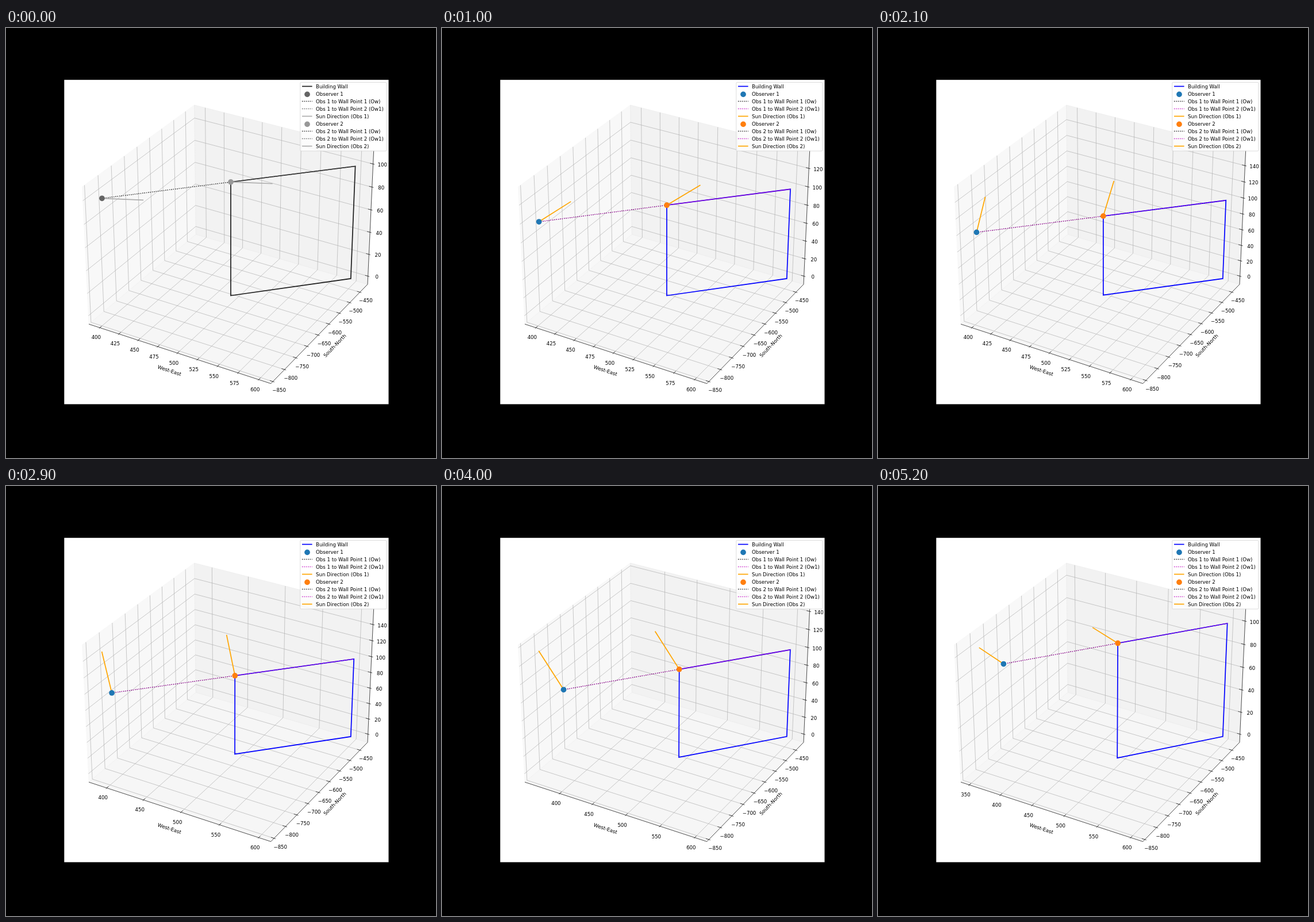
These frames come from a looping animation (748 px wide and 748 px high, 5.3 s). An HTML page with a canvas:

```html
<!DOCTYPE html>
<html lang="en">
<head>
<meta charset="utf-8">
<title>Sun path over a wall</title>
<style>
html, body { margin: 0; height: 100%; overflow: hidden; background: #000; }
canvas { display: block; }
</style>
</head>
<body>
<canvas id="stage" width="748" height="748"></canvas>
<script>
const ctx = document.getElementById('stage').getContext('2d');
const RAD = Math.PI / 180;
const FONT = "8.6px 'DejaVu Sans', sans-serif";
const THIN = 0.68, DOTTED = 1.27, THICK = 1.7;
const DOTS = [1.27, 2.1];

// Half sizes of the box: backing panes, and the part covered by data
const PANE = [0.5952, 0.5952, 0.4464];
const SPAN = [0.5195, 0.5195, 0.3896];
const PAD = [0.0395, 0.0395, 0.0296];
const TICK_OUT = 0.0095, TICK_IN = 0.019;

const COLORS = {
  wall: [0, 0, 255], obs1: [31, 119, 180], obs2: [255, 127, 14],
  black: [0, 0, 0], magenta: [191, 0, 191], sun: [255, 165, 0]
};
const OBS1 = [400, -830, 100], OBS2 = [500, -635, 100], END = [600, -440, 100];
const LEGEND = [
  ['Building Wall', 'wall', 'line'],
  ['Observer 1', 'obs1', 'dot'],
  ['Obs 1 to Wall Point 1 (Ow)', 'black', 'dotted'],
  ['Obs 1 to Wall Point 2 (Ow1)', 'magenta', 'dotted'],
  ['Sun Direction (Obs 1)', 'sun', 'line'],
  ['Observer 2', 'obs2', 'dot'],
  ['Obs 2 to Wall Point 1 (Ow)', 'black', 'dotted'],
  ['Obs 2 to Wall Point 2 (Ow1)', 'magenta', 'dotted'],
  ['Sun Direction (Obs 2)', 'sun', 'line']
];

let grey = false;
let limits;

function color(name) {
  const [r, g, b] = COLORS[name];
  const luma = Math.round(0.299 * r + 0.587 * g + 0.114 * b);
  return grey ? `rgb(${luma},${luma},${luma})` : `rgb(${r},${g},${b})`;
}

// Perspective view: elevation 30, azimuth -60, distance 10
function project([x, y, z]) {
  const depth = 10 - (0.433 * x - 0.75 * y + 0.5 * z);
  const u = 0.866 * x + 0.5 * y;
  const v = -0.25 * x + 0.433 * y + 0.866 * z;
  return [391 + 3048 * u / depth, 364.6 - 3048 * v / depth];
}

const scale = (value, axis) => {
  const [lo, hi] = limits[axis];
  return (2 * (value - lo) / (hi - lo) - 1) * SPAN[axis];
};
const plot = point => project(point.map(scale));
const shift = (point, delta) => point.map((value, i) => value + delta[i]);

function trace(points) {
  ctx.beginPath();
  points.forEach(([x, y]) => ctx.lineTo(x, y));
}

function line(points, stroke, width, dash = []) {
  trace(points);
  ctx.strokeStyle = stroke;
  ctx.lineWidth = width;
  ctx.setLineDash(dash);
  ctx.stroke();
}

function pane(corners, shade) {
  trace(corners.map(project));
  ctx.closePath();
  ctx.fillStyle = ctx.strokeStyle = `rgba(${shade},${shade},${shade},0.5)`;
  ctx.lineWidth = 0.85;
  ctx.setLineDash([]);
  ctx.fill();
  ctx.stroke();
}

function dot([x, y], name) {
  ctx.beginPath();
  ctx.arc(x, y, 4.87, 0, 2 * Math.PI);
  ctx.fillStyle = color(name);
  ctx.fill();
}

function text(string, x, y, align = 'center') {
  ctx.fillStyle = '#000';
  ctx.textAlign = align;
  ctx.fillText(string, x, y);
}

function axisTitle(string, x, y, angle) {
  ctx.save();
  ctx.translate(x, y);
  ctx.rotate(angle * RAD);
  text(string, 0, 3);
  ctx.restore();
}

function ticks(axis) {
  const [lo, hi] = limits[axis], range = hi - lo;
  const step = [10, 20, 25, 50, 100].find(s => s >= range * 1.1 / 9);
  const list = [];
  for (let t = Math.ceil((lo - 0.052 * range) / step) * step; t <= hi + 0.052 * range; t += step) list.push(t);
  return list;
}

function drawAxes() {
  const [a, , c] = PANE;
  pane([[-a, -a, -c], [-a, a, -c], [-a, a, c], [-a, -a, c]], 242);
  pane([[-a, a, -c], [a, a, -c], [a, a, c], [-a, a, c]], 230);
  pane([[-a, -a, -c], [a, -a, -c], [a, a, -c], [-a, a, -c]], 237);

  // Per axis: grid path, place on the axis, tick direction, label direction
  const axes = [
    { grid: t => [[t, -a, -c], [t, a, -c], [t, a, c]], edge: t => [t, -a, -c], tick: [0, -1, 0], out: [0, -1, -1] },
    { grid: t => [[a, t, -c], [-a, t, -c], [-a, t, c]], edge: t => [a, t, -c], tick: [1, 0, 0], out: [1, 0, -1] },
    { grid: t => [[-a, -a, t], [-a, a, t], [a, a, t]], edge: t => [a, a, t], tick: [1, 0, 0], out: [1, 1, 0] }
  ];
  axes.forEach(({ grid }, i) => {
    for (const value of ticks(i)) line(grid(scale(value, i)).map(project), '#b0b0b0', THIN);
  });
  axes.forEach(({ edge, tick, out }, i) => {
    line([edge(-PANE[i]), edge(PANE[i])].map(project), '#000', THIN);
    for (const value of ticks(i)) {
      const at = edge(scale(value, i));
      const ends = [TICK_OUT, -TICK_IN].map(k => shift(at, tick.map(d => d * k)));
      line(ends.map(project), '#000', THIN);
      const [x, y] = project(shift(at, out.map((d, j) => d * PAD[j])));
      text(String(value).replace('-', '\u2212'), x, y + 6.8);
    }
  });
  axisTitle('West-East', 284.3, 595.8, 18.2);
  axisTitle('South-North', 572, 552.5, -45.8);
}

function drawScene(sun) {
  const ground = ([x, y]) => [x, y, 0];
  trace([ground(OBS2), ground(END), END, OBS2].map(plot));
  ctx.closePath();
  ctx.strokeStyle = color('wall');
  ctx.lineWidth = THICK;
  ctx.setLineDash([]);
  ctx.stroke();

  const link = (from, to, name) => line([from, to].map(plot), color(name), DOTTED, DOTS);
  const ray = from => line([from, shift(from, sun)].map(plot), color('sun'), THICK);
  link(OBS1, OBS2, 'black');
  link(OBS1, END, 'magenta');
  ray(OBS1);
  link(OBS2, END, 'magenta');
  ray(OBS2);
  dot(plot(OBS1), 'obs1');
  dot(plot(OBS2), 'obs2');
}

function drawLegend() {
  ctx.beginPath();
  ctx.roundRect(511.8, 94.5, 150, 119.5, 1.7);
  ctx.fillStyle = 'rgba(255,255,255,0.8)';
  ctx.fill();
  ctx.strokeStyle = 'rgba(204,204,204,0.8)';
  ctx.lineWidth = 0.85;
  ctx.setLineDash([]);
  ctx.stroke();
  LEGEND.forEach(([label, name, kind], i) => {
    const y = 101.5 + 13 * i;
    if (kind === 'dot') dot([524, y + 0.9], name);
    else if (kind === 'line') line([[515, y], [532.6, y]], color(name), THICK);
    else line([[515, y], [532.6, y]], color(name), DOTTED, DOTS);
    text(label, 539, y + 3.2, 'left');
  });
}

// East, north and up parts of a 50 unit ray towards the sun
function sunRay(step) {
  const hour = (step - 25.85) * 3.75 * RAD, lat = 28.3 * RAD, decl = 22.1 * RAD;
  const { sin, cos } = Math;
  return [
    -cos(decl) * sin(hour),
    sin(decl) * cos(lat) - cos(decl) * sin(lat) * cos(hour),
    sin(lat) * sin(decl) + cos(lat) * cos(decl) * cos(hour)
  ].map(part => 50 * part);
}

function draw(now) {
  const step = Math.floor(now % 5300 / 100);
  const sun = sunRay(step);
  grey = step === 0;
  limits = [
    [400 + Math.min(0, sun[0]), 600],
    [-830 + Math.min(0, sun[1]), -440],
    [0, 100 + sun[2]]
  ];
  ctx.fillStyle = '#000';
  ctx.fillRect(0, 0, 748, 748);
  ctx.fillStyle = '#fff';
  ctx.fillRect(101.3, 90.2, 564.2, 564.2);
  ctx.font = FONT;
  drawAxes();
  drawScene(sun);
  drawLegend();
}

const start = performance.now();
function loop() {
  draw(performance.now() - start);
  requestAnimationFrame(loop);
}
loop();
</script>
</body>
</html>
```
